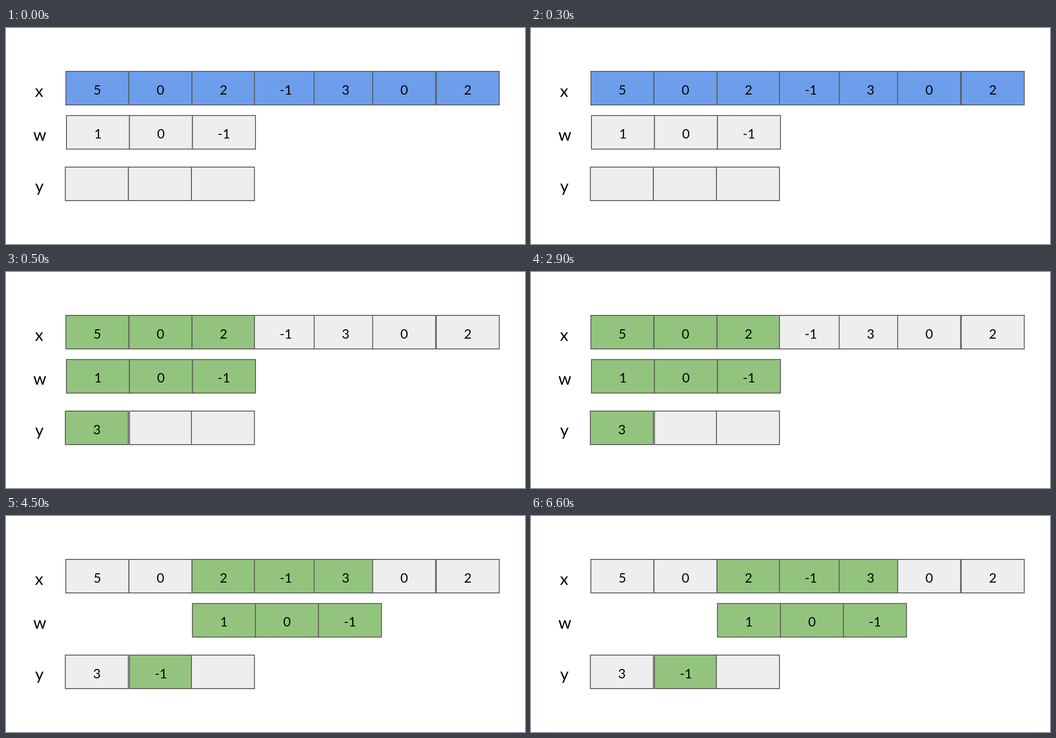
These frames come from a looping animation (1159 px wide and 483 px high, 8000 ms). An HTML page:

```html
<!DOCTYPE html>
<html lang="en">
<head>
<meta charset="utf-8">
<title>1D convolution with stride 2</title>
<style>
  html, body { margin: 0; width: 100%; height: 100%; overflow: hidden; background: #fff; }
  svg { display: block; width: 1159px; height: 483px; }
  text { font: 29.2px Carlito, Lato, sans-serif; text-anchor: middle; }
  .label { font-size: 37px; }
  rect { stroke: #595959; stroke-width: 2; }
</style>
</head>
<body>
<svg viewBox="0 0 1159 483">
  <text class="label" x="74" y="154">x</text>
  <text class="label" x="75.5" y="252">w</text>
  <text class="label" x="74.5" y="367">y</text>
  <g id="cells"></g>
</svg>
<script>
const BLUE = '#6d9eeb', GREY = '#eeeeee', GREEN = '#93c47d';
const WIDTH = 140.7, HEIGHT = 75, LOOP = 8000;
const xLefts = [133.7, 274.6, 415.4, 554.8, 688.2, 818.8, 960.8];
const xValues = [5, 0, 2, -1, 3, 0, 2];
const weights = [1, 0, -1];
const group = document.getElementById('cells');

const cell = (x, y, fill, value = '') =>
  `<rect x="${x}" y="${y}" width="${WIDTH}" height="${HEIGHT}" fill="${fill}"/>` +
  `<text x="${x + WIDTH / 2}" y="${y + 51.7}">${value}</text>`;

// step 0: before the start; step 1 and 2: the positions of the window
function scene(step) {
  const start = step === 2 ? 2 : 0;
  const xFill = i => !step ? BLUE : i >= start && i < start + 3 ? GREEN : GREY;
  const wLeft = 135 + start * WIDTH;
  const yLefts = [132.5, step ? 275.8 : 273.3, 414.1];
  const yValues = [step > 0 ? 3 : '', step > 1 ? -1 : '', ''];
  return [
    ...xValues.map((v, i) => cell(xLefts[i], 97, xFill(i), v)),
    ...weights.map((v, i) => cell(wLeft + i * WIDTH, 195.7, step ? GREEN : GREY, v)),
    ...yValues.map((v, i) => cell(yLefts[i], 311, i === step - 1 ? GREEN : GREY, v))
  ].join('');
}

let shown = -1;
function draw() {
  const t = performance.now() % LOOP;
  const step = t < 500 ? 0 : t < 4500 ? 1 : 2;
  if (step !== shown) group.innerHTML = scene(shown = step);
  requestAnimationFrame(draw);
}
draw();
</script>
</body>
</html>
```
